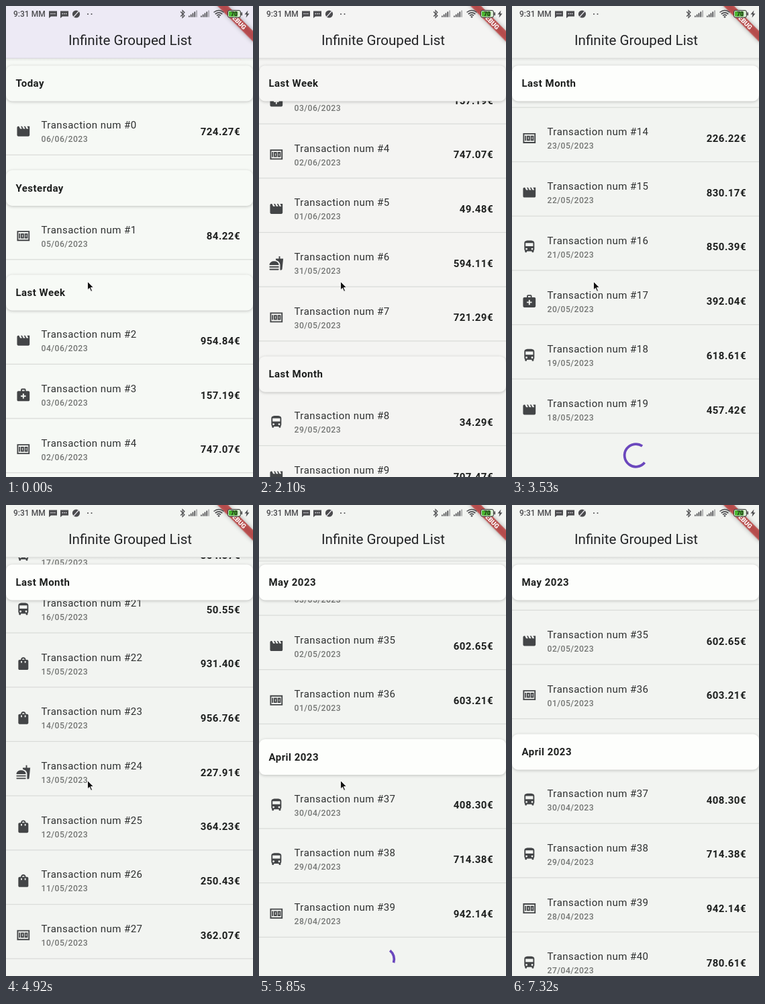
An HTML page that plays this animation: 368x700 px, repeating every 7710 ms.

```html
<!DOCTYPE html>
<html lang="en">
<head>
<meta charset="utf-8">
<title>Infinite Grouped List</title>
<style>
  html, body { margin: 0; width: 100%; height: 100%; overflow: hidden; background: #f4f5f2; }
  svg { display: block; width: 368px; height: 700px; font-family: Roboto, sans-serif; }
  .title { font-size: 15px; letter-spacing: .47px; fill: #2e3030; }
  .date { font-size: 12.2px; letter-spacing: .45px; font-weight: 500; fill: #747674; }
  .bold { font-size: 15px; letter-spacing: .47px; font-weight: 700; fill: #1d1f1e; }
  .icon { fill: #434547; fill-rule: evenodd; }
  .card { filter: drop-shadow(0 1px 2px rgba(0, 0, 0, .22)); }
</style>
</head>
<body>
<svg id="stage" viewBox="0 0 368 700">
  <defs>
    <clipPath id="viewport"><rect y="78" width="368" height="622"/></clipPath>
    <linearGradient id="barShadow" x2="0" y2="1">
      <stop stop-color="#000" stop-opacity=".09"/><stop offset="1" stop-color="#000" stop-opacity="0"/>
    </linearGradient>
  </defs>
  <rect id="body" width="368" height="700"/>
  <g clip-path="url(#viewport)">
    <g id="rows"></g>
    <path id="spinner" fill="none" stroke="#6b47bd" stroke-width="3.75"/>
    <g id="headers"></g>
  </g>
  <rect id="bar" width="368" height="78"/>
  <rect y="77" width="368" height="5" fill="url(#barShadow)"/>
  <text x="185" y="57.5" text-anchor="middle" font-size="20.6" fill="#222325">Infinite Grouped List</text>

  <g transform="translate(368 0) rotate(45)">
    <rect x="-40" y="26.2" width="80" height="11.2" fill="#b71c1c" fill-opacity=".68" style="filter:drop-shadow(0 0 3px rgba(0,0,0,.45))"/>
    <text y="35.2" text-anchor="middle" font-size="9.6" font-weight="900" fill="#fff">DEBUG</text>
  </g>

  <g id="statusBar" fill="#4b4b4e">
    <text x="11" y="15.8" font-size="12" font-weight="500">9:31 MM</text>
    <g id="chats"></g>
    <circle cx="104.5" cy="12" r="5.6"/>
    <path d="M100 17l9-10" stroke="#e8e6ec" stroke-width="1.2"/>
    <circle cx="122" cy="12" r="1"/><circle cx="127.5" cy="12" r="1"/>
    <path d="M260 8.5l6 6-3 3V6.5l3 3-6 6" fill="none" stroke="#4b4b4e" stroke-width="1.1"/>
    <g id="signals"></g>
    <path d="M309.5 9.5q7.5-6 15 0M311.7 12q5.3-4.2 10.6 0M314 14.3q3-2.4 6 0" fill="none" stroke="#4b4b4e" stroke-width="1.6"/>
    <circle cx="317" cy="16.2" r="1.3"/>
    <rect x="330.5" y="6.5" width="19" height="10.5" rx="2.5" fill="#d7ead0" stroke="#333"/>
    <rect x="332" y="8" width="13" height="7.5" rx="1" fill="#48b52e"/>
    <rect x="350.5" y="9.5" width="1.5" height="4.5" fill="#333"/>
    <text x="340" y="15" text-anchor="middle" font-size="8.5" font-weight="700" fill="#222">70</text>
    <path d="M360.5 6.5l-5 6h3l-1 5 5-6.2h-3z"/>
  </g>
  <path id="cursor" d="M0 0v12.5l2.9-2.7 2.2 5 2-.9-2.2-4.8h4z" fill="#111" stroke="#fff" stroke-width=".9"/>
</svg>
<script>
const LOOP = 7710, PITCH = 80.7, HEADER = 74.8, PINNED = 115;
const $ = id => document.getElementById(id);

const ICONS = {
  v: 'M18 4l2 4h-3l-2-4h-2l2 4h-3l-2-4H8l2 4H7L5 4H4c-1.1 0-2 .9-2 2v12c0 1.1.9 2 2 2h16c1.1 0 2-.9 2-2V4z',
  m: 'M2 4h20v16H2zM4 6v12h16V6zM5 8h2v8H5zM8 8h5v8H8zM10 10v4h1v-4zM14 8h5v8h-5zM16 10v4h1v-4z',
  h: 'M20 6h-4V4c0-1.1-.9-2-2-2h-4c-1.1 0-2 .9-2 2v2H4c-1.1 0-2 .9-2 2v12c0 1.1.9 2 2 2h16c1.1 0 2-.9 2-2V8c0-1.1-.9-2-2-2zM10 4h4v2h-4zM16 15h-3v3h-2v-3H8v-2h3v-3h2v3h3z',
  f: 'M18 23h1.7c.8 0 1.5-.6 1.6-1.5L23 5h-5V1h-2v4h-5l.3 2.4c1.7.5 3.3 1.3 4.3 2.2 1.4 1.4 2.4 2.9 2.4 5.3zM1 22v-1h15v1c0 .55-.45 1-1 1H2c-.55 0-1-.45-1-1zM16 15C16 7 1 7 1 15zM1 17h15v2H1z',
  b: 'M4 16c0 .9.4 1.7 1 2.2V20c0 .55.45 1 1 1h1c.55 0 1-.45 1-1v-1h8v1c0 .55.45 1 1 1h1c.55 0 1-.45 1-1v-1.8c.6-.5 1-1.3 1-2.2V6c0-3.5-3.6-4-8-4s-8 .5-8 4zM6 15.5a1.5 1.5 0 1 0 3 0a1.5 1.5 0 1 0-3 0zM15 15.5a1.5 1.5 0 1 0 3 0a1.5 1.5 0 1 0-3 0zM18 11H6V6h12z',
  s: 'M18 6h-2c0-2.2-1.8-4-4-4S8 3.8 8 6H6c-1.1 0-2 .9-2 2v12c0 1.1.9 2 2 2h12c1.1 0 2-.9 2-2V8c0-1.1-.9-2-2-2zM10 10a1 1 0 0 1-2 0V8h2zM12 4c1.1 0 2 .9 2 2h-4c0-1.1.9-2 2-2zM16 10a1 1 0 0 1-2 0V8h2z'
};

// One entry per transaction: icon key, then amount.
const ENTRIES = `v724.27 m84.22 v954.84 h157.19 m747.07 v49.48 f594.11 m721.29 b34.29 v707.47
  s516.09 h225.50 f740.96 s725.82 m226.22 v830.17 b850.39 h392.04 b618.61 v457.42
  b354.37 b50.55 s931.40 s956.76 f227.91 s364.23 s250.43 m362.07 v418.35 h573.90
  b126.48 s689.12 f305.76 m842.53 h91.64 v602.65 m603.21 b408.30 b714.38 m942.14 b780.61`.split(/\s+/);
const GROUPS = { 0: 'Today', 1: 'Yesterday', 2: 'Last Week', 8: 'Last Month', 31: 'May 2023', 37: 'April 2023' };

const dateOf = n => new Date(Date.UTC(2023, 5, 6 - n)).toISOString().slice(0, 10).split('-').reverse().join('/');

// Lay out the list in scroll coordinates.
const rowY = [], headers = [];
let edge = PINNED - HEADER / 2;
ENTRIES.forEach((entry, n) => {
  if (GROUPS[n]) {
    headers.push({ name: GROUPS[n], y: edge + HEADER / 2 });
    edge += HEADER;
  }
  rowY.push(edge + 33.8);
  edge += PITCH;
});

$('rows').innerHTML = ENTRIES.map((entry, n) => `<g transform="translate(0 ${rowY[n]})">
  <path class="icon" transform="translate(14.6 -11.2) scale(.936)" d="${ICONS[entry[0]]}"/>
  <text class="title" x="52.5" y="-4">Transaction num #${n}</text>
  <text class="date" x="52.5" y="16">${dateOf(n)}</text>
  <text class="bold" x="349" y="5.6" text-anchor="end">${entry.slice(1)}€</text>
  <rect y="34.5" width="368" height="1.2" fill="#d9dbd8"/></g>`).join('');
$('headers').innerHTML = headers.map(h => `<g><rect class="card" y="-26.5" width="368" height="53" rx="9"/>
  <text class="bold" x="14.5" y="5.3">${h.name}</text></g>`).join('');
const rowNodes = [...$('rows').children], headerNodes = [...$('headers').children];

$('chats').innerHTML = [64, 81].map(x => `<path d="M${x} 7.5h12v8h-9l-3 2.5z"/>
  <path d="M${x + 2.5} 11.5h7" stroke="#e8e6ec" stroke-width="1.5" stroke-dasharray="1.5 1.2"/>`).join('');
$('signals').innerHTML = [272, 290].map(x => [0, 1, 2, 3, 4].map(i =>
  `<rect x="${x + i * 2.8}" y="${14.5 - i * 2}" width="1.7" height="${2 + i * 2}" opacity="${i > 3 ? .45 : 1}"/>`).join('')).join('');

const SCROLL = [[1430, 0], [1640, 80], [2100, 437], [2660, 969.5], [2960, 1130], [3200, 1344],
  [4530, 1344], [4920, 1949], [5660, 2850], [5850, 3100], [5890, 3108]];

// Monotone cubic through the scroll points.
function scrollAt(t) {
  const P = SCROLL, last = P.length - 1;
  if (t <= P[0][0]) return 0;
  if (t >= P[last][0]) return P[last][1];
  const slope = i => (P[i + 1][1] - P[i][1]) / (P[i + 1][0] - P[i][0]);
  const tangent = i => {
    if (i === 0 || i === last) return 0;
    const a = slope(i - 1), b = slope(i);
    return a * b > 0 ? 2 * a * b / (a + b) : 0;
  };
  const i = P.findIndex((p, k) => t < P[k + 1][0]);
  const w = P[i + 1][0] - P[i][0], u = (t - P[i][0]) / w, v = 1 - u;
  return v * v * (1 + 2 * u) * P[i][1] + u * u * (3 - 2 * u) * P[i + 1][1]
    + w * u * v * (v * tangent(i) - u * tangent(i + 1));
}

const clamp = x => Math.min(1, Math.max(0, x));

// cubic-bezier(.4, 0, .2, 1)
function ease(x) {
  x = clamp(x);
  let lo = 0, hi = 1;
  for (let k = 0; k < 20; k++) {
    const s = (lo + hi) / 2, r = 1 - s;
    if (1.2 * r * r * s + .6 * r * s * s + s * s * s < x) lo = s; else hi = s;
  }
  return 3 * (1 - lo) * lo * lo + lo ** 3;
}

function arcPath(age, cy) {
  const phase = age / 1333 % 1, head = ease(phase * 2), tail = ease(phase * 2 - 1);
  const start = Math.PI * (-.5 + 1.5 * tail + 2 * (age / 2222) + .5 * phase);
  const sweep = Math.max(.01, 1.5 * Math.PI * (head - tail));
  const point = a => `${184.5 + 16.85 * Math.cos(a)} ${cy + 16.85 * Math.sin(a)}`;
  return `M${point(start)}A16.85 16.85 0 ${sweep > Math.PI ? 1 : 0} 1 ${point(start + sweep)}`;
}

const LOADS = [{ from: 2970, to: 4090, after: 19 }, { from: 5680, to: 6810, after: 39 }];
const THEMES = [
  { until: 1430, body: '#f6f9f5', bar: '#edeaf5', card: '#f7faf6' },
  { until: 2400, body: '#f4f4f2', bar: '#f4f4f3', card: '#f6f6f4' },
  { until: 3190, body: '#f3f5f2', bar: '#f3f4f2', card: '#f6f7f5' },
  { until: LOOP, body: '#f2f4f1', bar: '#f2f4f1', card: '#fdfefc' }
];

function render(t) {
  const scroll = scrollAt(t);
  const theme = THEMES.find(x => t < x.until);
  $('body').setAttribute('fill', theme.body);
  $('bar').setAttribute('fill', theme.bar);
  $('headers').setAttribute('fill', theme.card);

  $('rows').setAttribute('transform', `translate(0 ${-scroll})`);
  const loaded = t < LOADS[0].to ? 20 : t < LOADS[1].to ? 40 : ENTRIES.length;
  rowNodes.forEach((node, n) => node.style.display = n < loaded ? '' : 'none');

  headers.forEach((h, i) => {
    const next = headers[i + 1];
    const limit = next ? next.y - HEADER - scroll : Infinity;
    const y = Math.min(Math.max(PINNED, h.y - scroll), limit);
    headerNodes[i].setAttribute('transform', `translate(0 ${y})`);
    headerNodes[i].style.display = y < 20 || y > 740 ? 'none' : '';
  });

  const load = LOADS.find(l => t >= l.from && t < l.to);
  $('spinner').setAttribute('d', load ? arcPath(t - load.from, rowY[load.after] + 68 - scroll) : '');

  const leave = clamp((t - 6880) / 440) ** 1.2;
  $('cursor').setAttribute('transform', `translate(${121.5 + 205 * leave} ${409.5 + 292 * leave})`);
}

const began = performance.now();
function tick() {
  render((performance.now() - began) % LOOP);
  requestAnimationFrame(tick);
}
tick();
</script>
</body>
</html>
```
